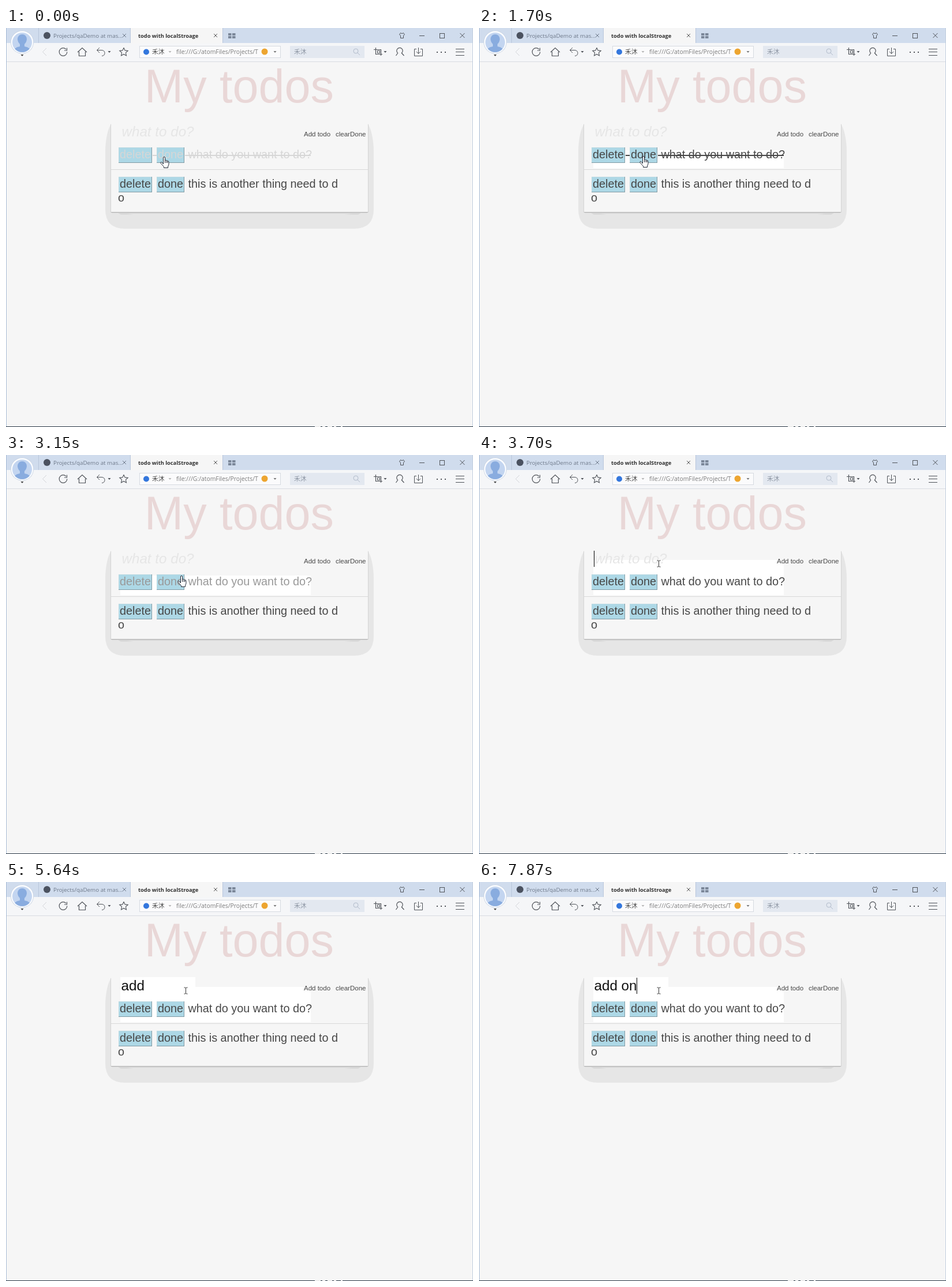
Animation of 809x692 px, one loop 8000 ms. Source, as an HTML page with a canvas:

```html
<!DOCTYPE html>
<html lang="en">
<head>
<meta charset="utf-8">
<title>My todos</title>
<style>
html, body { margin: 0; width: 100%; height: 100%; overflow: hidden; background: #f6f6f6; }
canvas { display: block; width: 809px; height: 692px; }
</style>
</head>
<body>
<canvas id="stage" width="809" height="692"></canvas>
<script>
const ctx = document.getElementById('stage').getContext('2d');
const LOOP = 8000;
const SANS = '"Liberation Sans", Arial, sans-serif';
const UI = '"Open Sans", "Noto Sans CJK SC", "Noto Sans CJK", sans-serif';
const LIST = '19.8px ' + SANS;
const PAGE = '#f6f6f6', INK = '#474747', ICON = '#4f5359';

function box(x, y, w, h, color) {
  ctx.fillStyle = color;
  ctx.fillRect(x, y, w, h);
}

function text(str, x, y, font, color) {
  ctx.font = font;
  ctx.fillStyle = color;
  ctx.fillText(str, x, y);
}

function line(points, color = ICON, width = 1) {
  ctx.beginPath();
  for (let i = 0; i < points.length; i += 2) ctx.lineTo(points[i], points[i + 1]);
  ctx.strokeStyle = color;
  ctx.lineWidth = width;
  ctx.stroke();
}

function arc(x, y, r, from = 0, to = Math.PI * 2, color = ICON, width = 1) {
  ctx.beginPath();
  ctx.arc(x, y, r, from, to);
  ctx.strokeStyle = color;
  ctx.lineWidth = width;
  ctx.stroke();
}

function disc(x, y, r, color) {
  ctx.beginPath();
  ctx.arc(x, y, r, 0, Math.PI * 2);
  ctx.fillStyle = color;
  ctx.fill();
}

function shape(d, fill, stroke) {
  const path = new Path2D(d);
  if (fill) { ctx.fillStyle = fill; ctx.fill(path); }
  if (stroke) { ctx.strokeStyle = stroke; ctx.lineWidth = 1; ctx.stroke(path); }
}

function frame(x, y, w, h, color) {
  ctx.strokeStyle = color;
  ctx.lineWidth = 1;
  ctx.strokeRect(x + 0.5, y + 0.5, w - 1, h - 1);
}

const drop = (x, y, color = ICON) => shape(`M${x - 2.5} ${y - 1}h5l-2.5 3z`, color);

function cross(x, y, r, color) {
  line([x - r, y - r, x + r, y + r], color);
  line([x - r, y + r, x + r, y - r], color);
}

function avatar() {
  disc(28, 24.5, 20, '#c5d0e0');
  disc(28, 24.5, 19.3, '#fafcff');
  disc(28, 25, 17, '#c3d5f0');
  ctx.save();
  ctx.beginPath();
  ctx.arc(28, 25, 17, 0, Math.PI * 2);
  ctx.clip();
  shape('M13 43Q12 34 24 32V28Q20 24 20 19Q21 11 28 11Q35 11 36 19Q36 24 32 28V32Q44 34 43 43Z', '#89acdf');
  ctx.restore();
  drop(28, 47, '#444');
}

function tabs() {
  box(0, 0, 809, 26, '#d0dced');
  box(56, 0, 1, 26, '#b9c7dc');
  box(215, 0, 1, 26, '#b9c7dc');
  box(216, 0, 159, 27, PAGE);
  box(375, 0, 1, 26, '#b9c7dc');
  disc(71, 13, 6, '#4b5260');
  text('Projects/qaDemo at mas...', 82, 17, '9.8px ' + UI, '#6d7889');
  text('todo with localStroage', 229, 17, 'bold 9.3px ' + UI, '#2f2f2f');
  cross(205, 13, 3, '#6d7889');
  cross(363, 13, 3, '#555');
  for (const x of [385, 392]) for (const y of [9, 14]) box(x, y, 5.5, 4, '#7b8799');
  shape('M683.500 8.500L681.500 11.500L683.500 13V17.500H688.500V13L690.500 11.500L688.500 8.500Q686 11 683.500 8.500Z', null, ICON);
  box(716, 13, 9, 1, ICON);
  frame(751, 9, 9, 9, ICON);
  cross(790.5, 13, 4, ICON);
}

function toolbar() {
  box(0, 26, 809, 32, '#f5f6f8');
  box(216, 25, 159, 2, PAGE);
  box(0, 58, 809, 1, '#d9dce1');
  line([70, 35, 63.5, 41.5, 70, 48], '#d2d4d8');

  arc(99, 41.5, 6.8, 0, 5.5, ICON, 1.2);
  line([105.5, 34.5, 105.5, 39, 101, 39], ICON, 1.2);
  line([124, 42, 132, 34.5, 140, 42], ICON, 1.2);
  line([126.5, 41, 126.5, 48.5, 137.5, 48.5, 137.5, 41], ICON, 1.2);
  shape('M162 34L157.500 38.500L162 43M157.500 38.500H166Q171 39 171 43.500Q171 48 166 48.500', null, ICON);
  drop(179, 41);

  const star = [];
  for (let i = 0; i <= 10; i++) {
    const a = -Math.PI / 2 + i * Math.PI / 5, r = i % 2 ? 3.6 : 7.6;
    star.push(204 + r * Math.cos(a), 41.8 + r * Math.sin(a));
  }
  line(star, ICON, 1.1);

  box(231, 31, 245, 21, '#fbfbfc');
  frame(231, 31, 245, 21, '#d6dae1');
  disc(243, 41.5, 5, '#3477dd');
  text('禾沐', 253, 45, '10.7px ' + UI, '#444');
  drop(284, 41, '#b5b5b5');
  text('file:///G:/atomFiles/Projects/T', 295, 45, '10.4px ' + UI, '#7c7c7c');
  disc(448, 41, 5.5, '#eda530');
  drop(466, 41, '#777');

  box(492, 31, 129, 21, '#e3e8f0');
  text('禾沐', 499, 45, '10.7px ' + UI, '#8a93a1');
  arc(606, 40, 4, 0, 7, '#b3bdcb');
  line([609, 43, 613, 47], '#b3bdcb');

  line([637, 37.5, 649.5, 37.5, 649.5, 48], ICON, 1.2);
  line([640.5, 34, 640.5, 45.5, 652, 45.5], ICON, 1.2);
  frame(643, 39, 5, 5, ICON);
  drop(657, 41);
  arc(682, 39.5, 5.2, 2.3, 7.1, ICON, 1.2);
  line([685, 43, 689.5, 48], ICON, 1.2);
  line([679, 43, 675.5, 48], ICON, 1.2);
  line([711, 36.5, 707.5, 36.5, 707.5, 48.5, 721.5, 48.5, 721.5, 36.5, 718, 36.5], ICON);
  line([714.5, 34, 714.5, 44], ICON);
  line([711, 41, 714.5, 44.5, 718, 41], ICON);
  for (const x of [746, 753, 760]) box(x, 41, 2, 2, ICON);
  for (const y of [36, 41, 47]) box(779, y, 15, 1, ICON);
}

function card() {
  shape('M182 166Q173 182 172 212V314Q172 348 206 348H603Q637 348 637 314V212Q636 182 627 166Z', '#e6e6e6');
  shape('M190 319H619L610 323.500H586L600 322H209L221 323.500H199Z', '#d6d6d6');
  box(181, 167, 447, 153, '#d4d4d4');
  box(182, 319, 445, 1, '#b9b9b9');
  box(183, 320, 443, 1, '#cfcfcf');
  box(182, 160, 445, 159, PAGE);
  box(182, 245, 445, 1, '#d9d9d9');
}

function button(label, x, y, w, color) {
  box(x, y, w, 27, '#add8e6');
  box(x, y, w, 1, '#bcd9e2');
  box(x, y, 1, 27, '#bcd9e2');
  box(x + w - 1, y, 1, 27, '#829ba4');
  box(x, y + 26, w, 1, '#829ba4');
  text(label, x + 2, y + 19, LIST, color);
}

function todo(label, y, color) {
  button('delete', 195, y, 58, color);
  button('done', 261, y, 48, color);
  text(label, 315.5, y + 19, LIST, color);
}

function hand(x, y) {
  ctx.save();
  ctx.translate(x, y);
  shape('M5.500 13V2Q5.500 .5 7 .5Q8.500 .5 8.500 2V7Q9.500 5.500 11 7Q12.500 6.200 13 7.800Q15 7.500 15 9.500V13Q15 15 13.500 17V19.500H6.500V17.500L1 11.500Q.3 9.800 2 9.500Q3.500 9.800 5.500 13Z', '#fff', '#222a38');
  line([8.5, 7, 8.5, 11], '#222a38');
  line([11, 7.5, 11, 11], '#222a38');
  line([13, 8, 13, 11], '#222a38');
  ctx.restore();
}

function beam(x, y) {
  for (const s of [-1, 1]) {
    line([x + 3 * s, y - 5.5, x + s, y - 5.5, x, y - 4.5, x, y + 4.5, x + s, y + 5.5, x + 3 * s, y + 5.5], '#333');
  }
}

// Latest entry whose start time has passed.
const pick = (track, t) => track.reduce((now, step) => t >= step[0] ? step : now)[1];

const TONE = [[0, '#d6d6d6'], [250, '#999'], [400, INK], [1850, '#8f8f8f'], [1980, '#c9c9c9'],
  [3150, '#999'], [3300, '#686868'], [3420, INK]];
const TYPED = [[0, ''], [4500, 'a'], [4780, 'ad'], [4930, 'add'], [5080, 'add '], [7590, 'add o'], [7870, 'add on']];
const CARET = [[0, false], [3700, true], [4250, false], [4500, true], [5640, false], [6140, true], [6600, false], [7150, true]];
const HAND = [[0, [267, 223]], [550, [277, 222]], [700, [278, 222]], [3150, [297, 209]], [3300, null]];

function repaintArea(t) {
  if (t >= 250) box(198, 212, 330, t < 550 ? 19 : 31, '#fff');
  if (t >= 3150) box(198, 209, 330, 34, '#fff');
  if (t >= 3300) box(198, 182, 330, 61, '#fff');
  if (t >= 4500) box(198, 165, 130, 30, '#fff');
}

function input(t) {
  const typed = pick(TYPED, t);
  const font = '24.2px ' + SANS;
  if (typed) text(typed, 199.5, 188, font, '#111');
  else text('what to do?', 200.5, 188, 'italic ' + font, '#e6e6e6');
  ctx.font = font;
  if (pick(CARET, t)) box(Math.floor(200 + ctx.measureText(typed).width - 0.5), 166, 1, 28, '#000');
}

function draw(t) {
  box(0, 0, 809, 692, PAGE);
  tabs();
  toolbar();
  avatar();
  text('My todos', 239.8, 129, '80.9px ' + SANS, '#e9d7d7');
  card();
  repaintArea(t);
  input(t);
  text('Add todo', 516, 188, '11.5px ' + SANS, INK);
  text('clearDone', 571, 188, '11.5px ' + SANS, INK);

  const tone = pick(TONE, t);
  todo('what do you want to do?', 207, tone);
  if (t < 250 || (t >= 1700 && t < 3150)) {
    box(254, 220, 7, 2, tone);
    box(310, 220, 218, 2, tone);
  }
  todo('this is another thing need to d', 258, INK);
  text('o', 194, 301, LIST, INK);

  const at = pick(HAND, t);
  if (at) hand(...at);
  else beam(311.5, 188.5);

  box(0, 0, 1, 692, '#a9bcd6');
  box(808, 0, 1, 692, '#c3cfdf');
  box(0, 691, 809, 1, '#243442');
  for (const [x, w] of [[535, 10], [548, 5], [557, 8], [568, 4], [580, 3]]) box(x, 691, w, 1, '#e8e8e8');
}

function tick(now) {
  draw(now % LOOP);
  requestAnimationFrame(tick);
}
requestAnimationFrame(tick);
</script>
</body>
</html>
```
